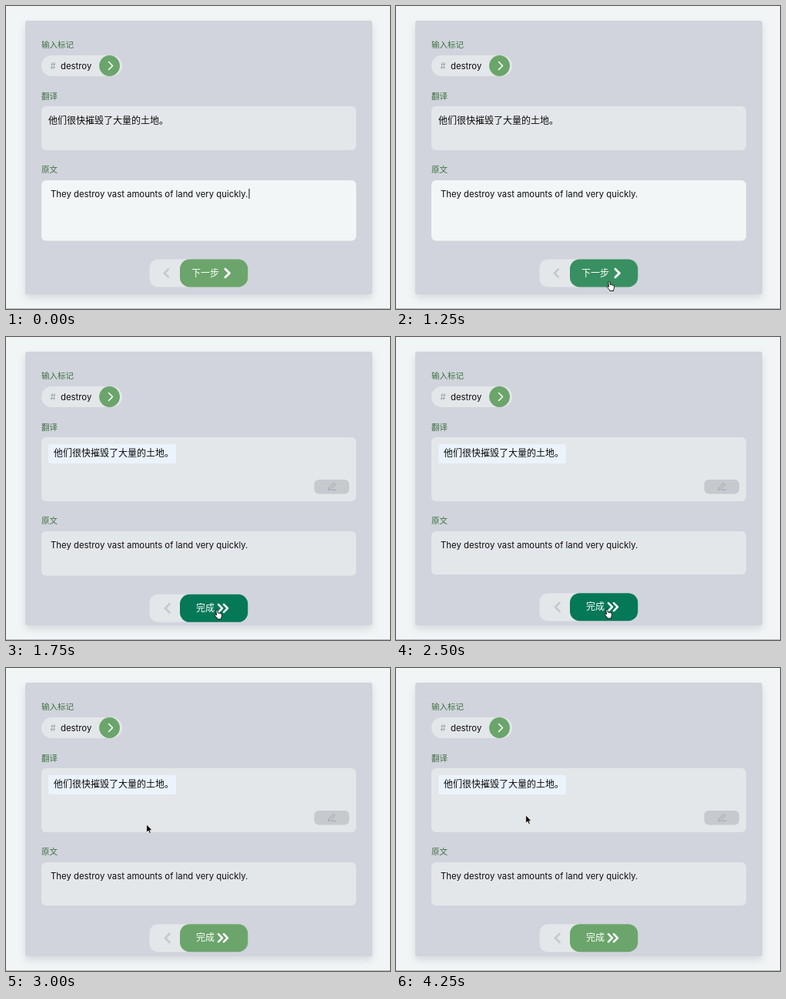
These frames come from a looping animation (499x393 px, 4.5 s). An HTML page:

```html
<!DOCTYPE html>
<html lang="zh-CN">
<head>
<meta charset="utf-8">
<title>输入标记</title>
<style>
  html, body { margin: 0; width: 100%; height: 100%; overflow: hidden; background: #f1f5f6; }
  svg { display: block; }
  text { font: 12px "Noto Sans CJK SC", "Noto Sans CJK", sans-serif; fill: #0b0b0c; }
  .latin { font: 11.35px Inter, sans-serif; }
  .label { font-size: 10.5px; fill: #3c7040; }
  .action { font-weight: 500; fill: #fff; }
  .field { fill: #e4e7ea; }
  .mark { fill: none; stroke-linecap: round; stroke-linejoin: round; }
  #panel { filter: drop-shadow(0 5px 5px rgba(40, 50, 60, .13)); }
</style>
</head>
<body>
<svg width="499" height="393" viewBox="0 0 499 393">
  <rect id="panel" x="25" y="19" width="451" height="355" rx="3" fill="#d1d4dc"/>
  <rect y="392" width="499" height="1" fill="#b4b7ba"/>

  <text class="label" x="46" y="54">输入标记</text>
  <rect class="field" x="46" y="64" width="105" height="27" rx="13.5"/>
  <text class="latin" x="57.5" y="81.7" style="fill:#9a9ea6">#</text>
  <text class="latin" x="71" y="81.7">destroy</text>
  <circle cx="134.5" cy="77.5" r="13.4" fill="#6ba56b"/>
  <path class="mark" d="M133.5 72.5l5 5-5 5" stroke="#fff" stroke-width="1.5"/>

  <text class="label" x="46" y="120.5">翻译</text>
  <rect id="translation" class="field" x="46" y="130" width="409" rx="6"/>
  <g id="chosen">
    <rect x="55" y="139" width="166" height="25" rx="2" fill="#ebf3fc"/>
    <rect x="400.5" y="185" width="45.5" height="18.5" rx="6" fill="#c6c9ce"/>
    <path class="mark" d="M419 198.2l.6-2.6 6.2-6.2 2 2-6.2 6.2zM423.5 198.4h5" stroke="#a0a4ab"/>
  </g>
  <text id="sentence">他们很快摧毁了大量的土地。</text>

  <g id="original">
    <text class="label" x="46" y="216">原文</text>
    <rect id="answer" x="46" y="226" width="409" rx="6"/>
    <text class="latin" x="58" y="248">They destroy vast amounts of land very quickly.</text>
    <rect id="caret" x="315.5" y="237" width="1" height="13" fill="#111"/>
  </g>

  <g id="buttons">
    <path class="field" d="M199 328.5h41v36h-41q-12.5 0-12.5-12.5v-11q0-12.5 12.5-12.5z"/>
    <path id="back" class="mark" stroke="#c6c9ce" stroke-width="2.8"/>
    <rect id="main" x="226" y="328.5" width="88.3" height="36" rx="12.5"/>
    <g id="next">
      <text class="action" x="241" y="350.8">下一步</text>
      <path class="mark" d="M285 341.2l5.4 5.3-5.4 5.3" stroke="#fff" stroke-width="3"/>
    </g>
    <g id="done">
      <text class="action" x="247" y="350.8">完成</text>
      <path class="mark" d="M276 341.5l5 5-5 5M283 341.5l5 5-5 5" stroke="#fff" stroke-width="2.6"/>
    </g>
  </g>

  <path id="arrow" d="M0 0V10.2L2.3 8.1 3.9 11.6 5.6 10.8 4.1 7.4H7.2Z"
    fill="#000" stroke="#fff" stroke-width=".7" stroke-linejoin="round"/>
  <path id="hand" d="M-1.1.9C-1-.3.9-.3 1 1L1.4 4.2C2 3.6 3 3.8 3.2 4.5 3.9 4 4.9 4.3 5 5 5.8 4.7 6.5 5.2 6.5 6 6.7 8 6.2 9.5 5.6 10.6V12H.8L.7 11.2C-.8 9.6-1.6 8-2.8 6.9-3.4 6-2.2 5.3-1.3 6.2L-.5 7Z"
    fill="#fff" stroke="#000" stroke-width=".9" stroke-linejoin="round"/>
</svg>
<script>
  const LOOP = 4500;
  const GREEN = '#6ba56b', MIXED = '#388f61', DARK = '#047857';

  // Each step changes only the listed properties.
  const steps = [
    { at: 0, done: false, caret: true, color: GREEN, settle: 0, pointer: null, x: 0, y: 0 },
    { at: 250, caret: false },
    { at: 750, caret: true },
    { at: 1000, pointer: 'arrow', x: 295, y: 371 },
    { at: 1250, caret: false, color: MIXED, pointer: 'hand', x: 277, y: 357.5 },
    { at: 1500, color: DARK, x: 274, y: 354 },
    { at: 1750, done: true, settle: 2 },
    { at: 2000, settle: 0, y: 353 },
    { at: 2750, color: MIXED, pointer: 'arrow', x: 196.5, y: 259.5 },
    { at: 3000, color: GREEN, x: 182.7, y: 203 },
    { at: 3250, x: 169.5, y: 192 },
    { at: 3500, x: 168, y: 190 },
    { at: 3750, x: 168.7, y: 191 }
  ];

  const $ = id => document.getElementById(id);
  const set = (id, attrs) => {
    for (const name in attrs) $(id).setAttribute(name, attrs[name]);
  };
  const show = (id, visible) => set(id, { visibility: visible ? 'visible' : 'hidden' });
  const move = (id, x, y) => set(id, { transform: `translate(${x} ${y})` });

  function render(time) {
    const s = Object.assign({}, ...steps.filter(step => step.at <= time));
    show('chosen', s.done);
    show('next', !s.done);
    show('done', s.done);
    show('caret', s.caret);
    set('translation', { height: s.done ? 83 : 57 });
    set('sentence', s.done ? { x: 62, y: 155.4 } : { x: 55, y: 152.8 });
    move('original', 0, s.done ? 26 : 0);
    set('answer', s.done
      ? { height: 56 + s.settle * .75, fill: '#e4e7ea' }
      : { height: 78.5, fill: '#f2f6f7' });
    move('buttons', 0, s.done ? 3.7 + s.settle * .8 : 0);
    set('back', { d: s.done ? 'M212.5 341l-5.6 5.5 5.6 5.5' : 'M210.8 341.6l-5 4.9 5 4.9' });
    set('main', { fill: s.color });
    for (const id of ['arrow', 'hand']) {
      show(id, s.pointer === id);
      move(id, s.x, s.y);
    }
  }

  const start = performance.now();
  function tick() {
    render((performance.now() - start) % LOOP);
    requestAnimationFrame(tick);
  }
  tick();
</script>
</body>
</html>
```
